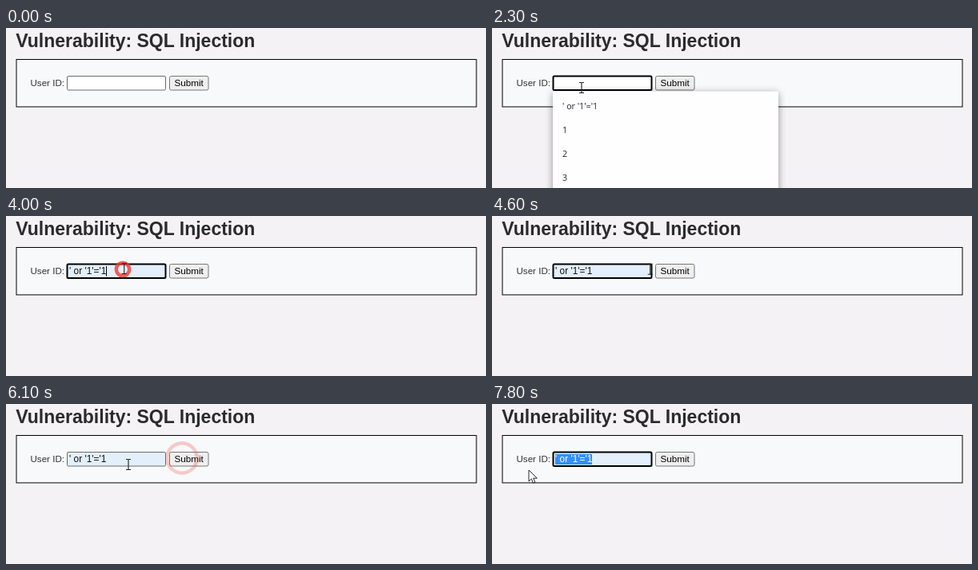
Write an HTML page that moves like this. It is 600 by 201 pixels and loops after 8 s.

```html
<!DOCTYPE html>
<html lang="en">
<head>
<meta charset="utf-8">
<title>SQL injection form</title>
<style>
  html, body { margin: 0; width: 100%; height: 100%; overflow: hidden; background: #f4f2f4; }
  svg { display: block; width: 600px; height: 201px; font: 11.7px "Liberation Sans", Arial, sans-serif; }
  text { white-space: pre; }
  .title { font-size: 23px; font-weight: bold; fill: #2b2a2d; }
  .menu text { font: 10.7px "Open Sans", sans-serif; fill: #222; }
  .panel { fill: #fefdff; filter: drop-shadow(0 2px 5px rgba(0, 0, 0, .4)); }
</style>
</head>
<body>
<svg viewBox="0 0 600 201">
  <rect width="600" height="201" fill="#f4f2f4"/>
  <text class="title" x="12.3" y="24">Vulnerability: SQL Injection</text>
  <rect x="13" y="39.5" width="575" height="59.5" fill="#f7f9fa" stroke="#000"/>
  <text x="30.5" y="72.6" font-size="11.6" fill="#333">User ID:</text>

  <rect id="field" x="76.5" y="60.5" width="123" height="17.5" rx="1.5"/>
  <rect id="selection" y="63" height="13" fill="#338fff"/>
  <text id="value" x="79" y="73" font-size="11.9">' or '1'='1</text>
  <rect id="caret" y="63" width="1" height="12.5"/>

  <rect id="button" x="204.5" y="60.5" width="48.5" height="17.5" rx="2"/>
  <text x="210.4" y="73">Submit</text>

  <g id="menu" class="menu">
    <rect class="panel" x="76" y="79.5" width="282" height="140" rx="2"/>
    <rect id="hover" x="76" y="83.5" width="282" height="30" fill="#ececee"/>
    <text x="88" y="102">' or '1'='1</text>
    <text x="88" y="132">1</text>
    <text x="88" y="162">2</text>
    <text x="88" y="192">3</text>
  </g>

  <circle id="ring" fill="none" stroke="#f23a30" stroke-width="4.5"/>
  <g id="cursor">
    <path id="arrow" d="M0 0V14.2L3.3 11.1L5.6 16.2L7.9 15.2L5.7 10.2H10.3Z" fill="#fff" stroke="#111" stroke-width=".9"/>
    <path id="beam" d="M-3 -6.5H-1Q0 -6.5 0 -5.5Q0 -6.5 1 -6.5H3M0 -5.5V5.5M-3 6.5H-1Q0 6.5 0 5.5Q0 6.5 1 6.5H3" fill="none" stroke="#222" stroke-width="1.1"/>
  </g>
</svg>
<script>
  const LOOP = 8000, STEP = 100, RING_TIME = 500;
  const TEXT_LEFT = 79, TEXT_RIGHT = 125;
  const DRAG_START = 7200, DRAG_END = 7600;

  const el = id => document.getElementById(id);
  const show = (id, on) => el(id).style.display = on ? "" : "none";
  const set = (id, attrs) => {
    for (const name in attrs) el(id).setAttribute(name, attrs[name]);
  };
  const within = (v, from, to) => v >= from && v < to;
  const clamp = (v, low, high) => Math.min(high, Math.max(low, v));
  const ease = p => p * p * (3 - 2 * p);

  const at = (x, y) => ({ x, y });
  const entry = at(160, 196), field = at(112, 75), row = at(146, 97), value = at(146, 66),
        submit = at(220, 67), below = at(153, 76), margin = at(8, 80), label = at(46, 83);

  // Each glide carries the pointer on to the next spot.
  const glides = [
    { from: 100, to: 900, spot: field },
    { from: 2800, to: 3100, spot: row },
    { from: 3400, to: 3800, spot: value },
    { from: 3900, to: 5000, spot: submit },
    { from: 5750, to: 6100, spot: below },
    { from: 6100, to: 6900, spot: submit },
    { from: 7000, to: DRAG_END, spot: margin },
    { from: DRAG_END, to: 7800, spot: label }
  ];

  const clicks = [
    { time: 1700, spot: field },
    { time: 3300, spot: row },
    { time: 3950, spot: value },
    { time: 5350, spot: submit },
    { time: 5740, spot: submit },
    { time: 6980, spot: submit }
  ];

  function pointerAt(t) {
    let { x, y } = entry;
    for (const { from, to, spot } of glides) {
      const p = ease(clamp((t - from) / (to - from), 0, 1));
      x += (spot.x - x) * p;
      y += (spot.y - y) * p;
    }
    return { x, y };
  }

  function drawRing(t) {
    const click = clicks.findLast(c => within(t, c.time, c.time + RING_TIME));
    show("ring", click);
    if (!click) return;
    const p = (t - click.time) / RING_TIME;
    set("ring", { cx: click.spot.x, cy: click.spot.y + 1, r: 6.5 + 17 * p, opacity: 0.9 * (1 - p) });
  }

  function drawForm(t, { x, y }) {
    const filled = t >= 3000;
    const selecting = t >= DRAG_START;
    const focused = within(t, 1700, 5300) || selecting;
    const onRow = within(y, 60, 79);
    const overButton = onRow && within(x, 204, 253);

    set("field", {
      fill: filled ? "#e3effa" : "#fff",
      stroke: focused ? "#000" : "#6c6c6c",
      "stroke-width": focused ? 2 : 1
    });
    set("button", {
      fill: overButton ? "#e3e3e3" : "#efefef",
      stroke: overButton ? "#4f4f4f" : "#767676"
    });

    show("value", filled);
    set("value", { fill: t >= DRAG_END ? "#fff" : "#111" });
    show("caret", within(t, 1700, 2200) || within(t, 3900, 4400) || within(t, 4900, 5300));
    set("caret", { x: filled ? TEXT_RIGHT : TEXT_LEFT });

    const left = clamp(pointerAt(Math.min(t, DRAG_END)).x, TEXT_LEFT, TEXT_RIGHT);
    show("selection", selecting);
    set("selection", { x: left, width: TEXT_RIGHT - left });

    const menuOpen = within(t, 1900, 3400);
    show("menu", menuOpen);
    show("hover", menuOpen && filled);

    const beam = onRow && within(x, 76, 200) || within(t, DRAG_START, 7800);
    show("beam", beam);
    show("arrow", !beam);
  }

  function draw(t) {
    const pointer = pointerAt(t);
    drawForm(t, pointer);
    drawRing(t);
    show("cursor", t >= 100);
    set("cursor", { transform: `translate(${pointer.x} ${pointer.y})` });
  }

  const start = performance.now();
  function tick() {
    const t = (performance.now() - start) % LOOP;
    draw(Math.floor(t / STEP) * STEP);
    requestAnimationFrame(tick);
  }
  tick();
</script>
</body>
</html>
```
